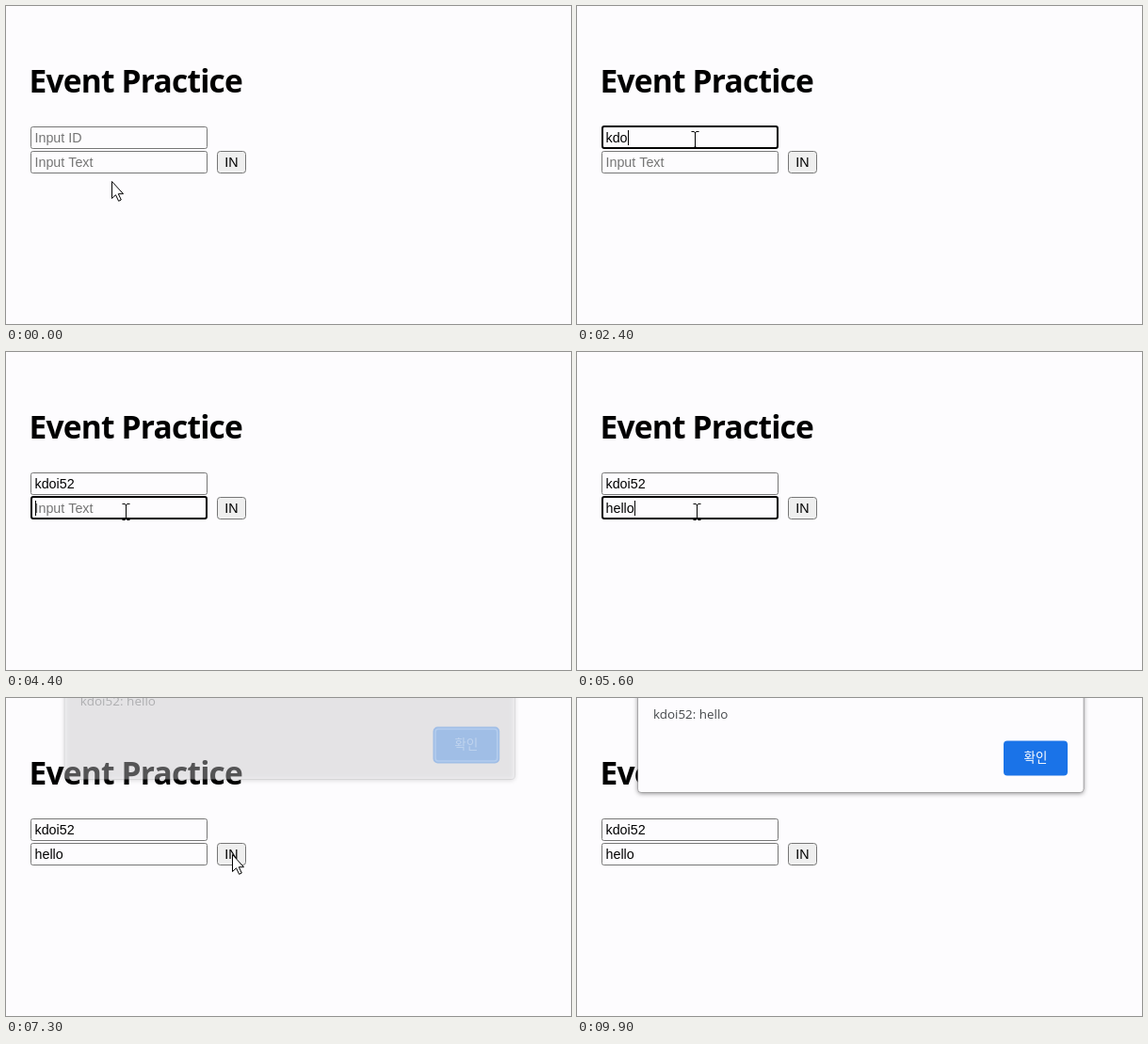
An HTML page with a canvas that plays this animation: 600 by 338 pixels, repeating every 10000 ms.

```html
<!DOCTYPE html>
<html lang="en">
<head>
<meta charset="utf-8">
<title>Event Practice</title>
<style>
html, body { margin: 0; width: 100%; height: 100%; overflow: hidden; background: #fdfcfe; }
canvas { display: block; }
</style>
</head>
<body>
<canvas id="stage" width="600" height="338"></canvas>
<script>
const ctx = document.getElementById("stage").getContext("2d");
const LOOP = 10000, STEP = 100;
const PAPER = "#fdfcfe", BLUE = "#1a73e8";
const UI_FONT = "14.3px 'Liberation Sans', Arial, sans-serif";
const USER = "kdoi52", MESSAGE = "hello";

// Key times: when each text length is reached.
const idField = {
  y: 128, hint: "Input ID", value: USER, focus: 700, blur: 4000, squiggle: 3400,
  keys: [[1800, 1], [2100, 2], [2400, 3], [2700, 4], [3000, 5], [3200, 6]]
};
const textField = {
  y: 154, hint: "Input Text", value: MESSAGE, focus: 4000, blur: 7100, squiggle: Infinity,
  keys: [[4800, 1], [5000, 2], [5300, 3], [5600, 5]]
};

// Pointer path: time, x, y.
const path = [
  [0, 112, 186], [100, 112, 186], [600, 125, 142], [3300, 125, 142], [3500, 127, 155],
  [3800, 127, 170], [6200, 127, 170], [6600, 165, 184], [7000, 240, 166],
  [7600, 240, 166], [7900, 250, 290]
];

function box(x, y, w, h, r, fill, stroke, line = 1) {
  ctx.beginPath();
  ctx.roundRect(x, y, w, h, r);
  if (fill) { ctx.fillStyle = fill; ctx.fill(); }
  if (stroke) { ctx.strokeStyle = stroke; ctx.lineWidth = line; ctx.stroke(); }
}

function label(str, x, y, font, color, align = "left", spacing = 0) {
  ctx.font = font;
  ctx.fillStyle = color;
  ctx.textAlign = align;
  ctx.letterSpacing = spacing + "px";
  ctx.fillText(str, x, y);
}

function drawField(f, t) {
  const focused = t >= f.focus && t < f.blur;
  if (focused) box(27, f.y, 186, 23, 2, PAPER, "#000", 2);
  else box(26.5, f.y + .5, 187, 23, 2, PAPER, "#767676");

  let [since, count] = [f.focus, 0];
  for (const [at, n] of f.keys) if (t >= at) [since, count] = [at, n];
  const value = f.value.slice(0, count);
  label(value || f.hint, 30.5, f.y + 17, UI_FONT, value ? "#000" : "#757575");
  if (!focused) return;

  const end = 30.5 + ctx.measureText(value).width;
  if ((t - since) % 1000 < 500) {
    ctx.fillStyle = "#000";
    ctx.fillRect(Math.round(end), f.y + 4, 1, 16);
  }
  if (t >= f.squiggle) {
    ctx.beginPath();
    for (let x = 31, i = 0; x < end; x += 2, i++) ctx.lineTo(x, f.y + (i % 2 ? 19 : 21));
    ctx.strokeStyle = "#e5483d";
    ctx.lineWidth = 1;
    ctx.stroke();
  }
}

function drawDialog(t) {
  const u = Math.min(1, (t - 7220) / 240);
  if (u <= 0) return;
  const zoom = 1 + .015 * (1 - u);
  ctx.save();
  ctx.globalAlpha = u;
  ctx.translate(301, -21 * (1 - u));
  ctx.scale(zoom, 1);
  ctx.translate(-301, 0);

  ctx.shadowColor = "rgba(0,0,0,.45)";
  ctx.shadowBlur = 5;
  ctx.shadowOffsetY = 1;
  box(64.5, -40, 473.5, 140.5, 4, PAPER);
  ctx.shadowColor = "transparent";
  box(64.5, -40, 473.5, 140.5, 4, null, "rgba(0,0,0,.25)");

  label(`${USER}: ${MESSAGE}`, 81, 21.5, "13.4px 'Open Sans', 'Noto Sans', sans-serif", "#45484b");
  if (t < 9700) {
    box(452, 44.5, 70, 39, 5, BLUE);
    box(454.5, 47, 65, 34, 3, null, "#dce9fc", 1.5);
  } else {
    box(453, 45.5, 68, 37, 4, BLUE);
  }
  label("확인", 487, 68, "13.5px 'Noto Sans CJK KR', 'Noto Sans CJK', sans-serif", "#fff", "center");
  ctx.restore();
}

function pointerAt(t) {
  const i = path.findIndex(p => p[0] > t);
  const [t0, x0, y0] = path[i - 1], [t1, x1, y1] = path[i];
  const u = (t - t0) / (t1 - t0), e = u * u * (3 - 2 * u);
  return [x0 + (x1 - x0) * e, y0 + (y1 - y0) * e];
}

function drawPointer(x, y) {
  ctx.save();
  ctx.translate(Math.round(x), Math.round(y));
  ctx.lineWidth = 1;
  ctx.strokeStyle = "#000";
  if (x > 26 && x < 214 && y > 127 && y < 178) {
    ctx.stroke(new Path2D("M-3.5-8.5H-1L.5-7.5L2-8.5H4.5M.5-8V8M-3.5 8.5H-1L.5 7.5L2 8.5H4.5"));
  } else {
    const arrow = new Path2D("M.5 .5V18.5L4.5 14.8L7.6 21.3L10.3 20L7.3 13.7H12.5Z");
    ctx.fillStyle = "#fff";
    ctx.fill(arrow);
    ctx.stroke(arrow);
  }
  ctx.restore();
}

function draw(t) {
  ctx.fillStyle = PAPER;
  ctx.fillRect(0, 0, 600, 338);
  label("Event Practice", 24.5, 91.5, "bold 33.5px 'Open Sans', 'Noto Sans', sans-serif", "#000", "left", -.8);
  drawField(idField, t);
  drawField(textField, t);

  const visible = t < 7900;
  const [x, y] = visible ? pointerAt(t) : [-50, -50];
  const hover = x > 224 && x < 255 && y > 154 && y < 178 && t < 7300;
  box(224.5, 154.5, 30, 23, 3, hover ? "#e5e5e5" : "#efefef", "#767676");
  label("IN", 239.5, 171, UI_FONT, "#000", "center");

  drawDialog(t);
  if (visible) drawPointer(x, y);
}

function tick() {
  const t = performance.now() % LOOP;
  draw(Math.floor(t / STEP) * STEP);
  requestAnimationFrame(tick);
}
tick();
</script>
</body>
</html>
```
